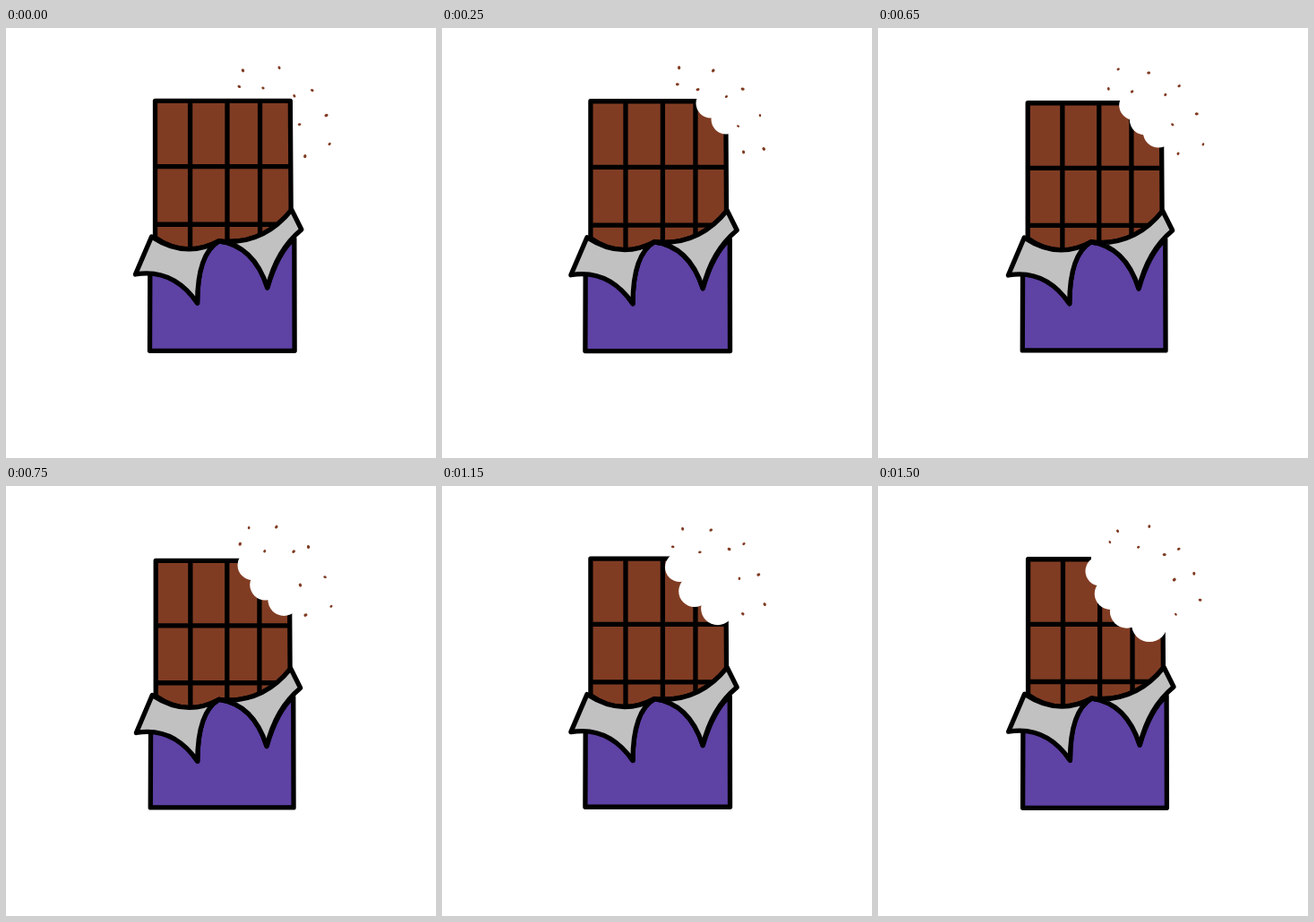
Recreate the animation shown at these times as an HTML page with a canvas. Size 480 by 480 pixels, loop 1.75 s.

```html
<!DOCTYPE html>
<html lang="en">
<head>
<meta charset="utf-8">
<title>Chocolate bar</title>
<style>
html, body { margin: 0; width: 100%; height: 100%; overflow: hidden; background: #fff; }
canvas { display: block; width: 480px; height: 480px; }
</style>
</head>
<body>
<canvas id="stage" width="480" height="480"></canvas>
<script>
const ctx = document.getElementById('stage').getContext('2d');
const STEP = 250, POSES = 7;
const BROWN = '#803c23', PURPLE = '#5e42a4', FOIL = '#c1c1c1';

// Average places of the crumbs: an outer arc, then an inner one
const crumbs = [
  [268, 47], [304, 47], [338, 67], [355, 98], [360, 131],
  [259, 66], [287, 71], [318, 74], [330, 107], [334, 141]
];

const lerp = (a, b, t) => a + (b - a) * t;

function seeded(seed) {
  return () => {
    const n = Math.sin(++seed * 12.9898) * 43758.5453;
    return n - Math.floor(n);
  };
}

// Hand-drawn wobble: each edge sways by whole waves per loop
function makeWarp(pose) {
  const sway = (size, peak, waves = 1) =>
    size * Math.cos(waves * (pose - peak) / POSES * Math.PI * 2);
  const left = 0.7 + sway(0.9, 2.5, 2);
  const right = 0.4 + sway(0.7, 6);
  const top = sway(1.2, 2.2) + sway(0.9, 2.5, 2);
  const foil = sway(1, 1.8);
  const base = sway(1.2, 0.8) - 0.6;
  const shiftY = y => y < 219
    ? lerp(top, foil, (y - 82) / 137)
    : lerp(foil, base, Math.max(0, (y - 300) / 60));
  return (x, y) => [x + lerp(left, right, (x - 160) / 160), y + shiftY(y)];
}

// First item is the start; two numbers make a line, four a curve
function outline(warp, [start, ...parts], closed = true) {
  const path = new Path2D();
  path.moveTo(...warp(...start));
  for (const p of parts) {
    if (p.length === 2) path.lineTo(...warp(...p));
    else path.quadraticCurveTo(...warp(p[0], p[1]), ...warp(p[2], p[3]));
  }
  if (closed) path.closePath();
  return path;
}

function paint(path, fill) {
  ctx.fillStyle = fill;
  ctx.fill(path);
  ctx.stroke(path);
}

function drawBar(warp) {
  const bar = outline(warp, [[166, 82], [316.5, 82], [317.3, 204],
    [286, 243, 237, 238], [200, 258, 166, 234]]);
  paint(bar, BROWN);
  ctx.save();
  ctx.clip(bar);
  const line = (a, b) => ctx.stroke(outline(warp, [a, b], false));
  for (const x of [205, 246.3, 282.8]) line([x, 82], [x, 250]);
  for (const y of [155, 219.3]) line([164, y], [319, y]);
  ctx.restore();
}

// A row of round tooth marks that eats its way in from the corner
function drawBite(pose) {
  const depth = (pose - 1) / (POSES - 2);
  const eased = depth ** 0.8;
  const last = 1 + Math.floor((pose + 1) / 3);
  const marks = [];
  for (let i = 0; i <= last; i++) {
    const t = i / last;
    const bulge = 8 * depth * Math.sin(Math.PI * t);
    marks.push({
      x: lerp(lerp(300, 248, eased), lerp(317, 303, eased), t) - bulge,
      y: lerp(84 + 11 * depth, lerp(102, 154, eased), t) + bulge * 0.8,
      r: 16.5 + 3.5 * t * depth
    });
  }
  const start = marks[0].x - 10;
  ctx.fillStyle = '#fff';
  ctx.beginPath();
  ctx.moveTo(start, 70);
  ctx.lineTo(start, 86);
  for (const { x, y } of marks) ctx.lineTo(x, y);
  ctx.lineTo(330, marks[last].y);
  ctx.lineTo(330, 70);
  ctx.fill();
  for (const { x, y, r } of marks) {
    ctx.beginPath();
    ctx.arc(x, y, r, 0, Math.PI * 2);
    ctx.fill();
  }
}

function drawWrapper(warp) {
  paint(outline(warp, [[160.3, 273], [186, 268, 213, 307], [213, 252, 237, 238],
    [276, 243, 291, 290], [303, 250, 321, 235], [321.3, 360], [160, 360]]), PURPLE);
  paint(outline(warp, [[162, 233], [200, 258, 237, 238], [213, 252, 213, 307],
    [186, 268, 144, 275]]), FOIL);
  paint(outline(warp, [[237, 238], [286, 243, 318, 203], [329, 225],
    [301, 248, 291, 290], [276, 243, 237, 238]]), FOIL);
}

function drawCrumbs(pose) {
  const random = seeded(pose * 100);
  const jitter = () => (random() - 0.5) * 8;
  ctx.fillStyle = BROWN;
  for (const [x, y] of crumbs) {
    const r = 1.2 + 0.5 * random();
    ctx.beginPath();
    ctx.ellipse(x + jitter(), y + jitter(), r + 0.4, r, random() * Math.PI, 0, Math.PI * 2);
    ctx.fill();
  }
}

function draw(pose) {
  const warp = makeWarp(pose);
  ctx.fillStyle = '#fff';
  ctx.fillRect(0, 0, 480, 480);
  ctx.strokeStyle = '#000';
  ctx.lineWidth = 5.3;
  ctx.lineJoin = ctx.lineCap = 'round';
  drawBar(warp);
  if (pose > 0) drawBite(pose);
  drawWrapper(warp);
  drawCrumbs(pose);
}

let shown = 0;
const begin = performance.now();
function tick() {
  const pose = Math.floor((performance.now() - begin) / STEP) % POSES;
  if (pose !== shown) draw(shown = pose);
  requestAnimationFrame(tick);
}
draw(0);
requestAnimationFrame(tick);
</script>
</body>
</html>
```
